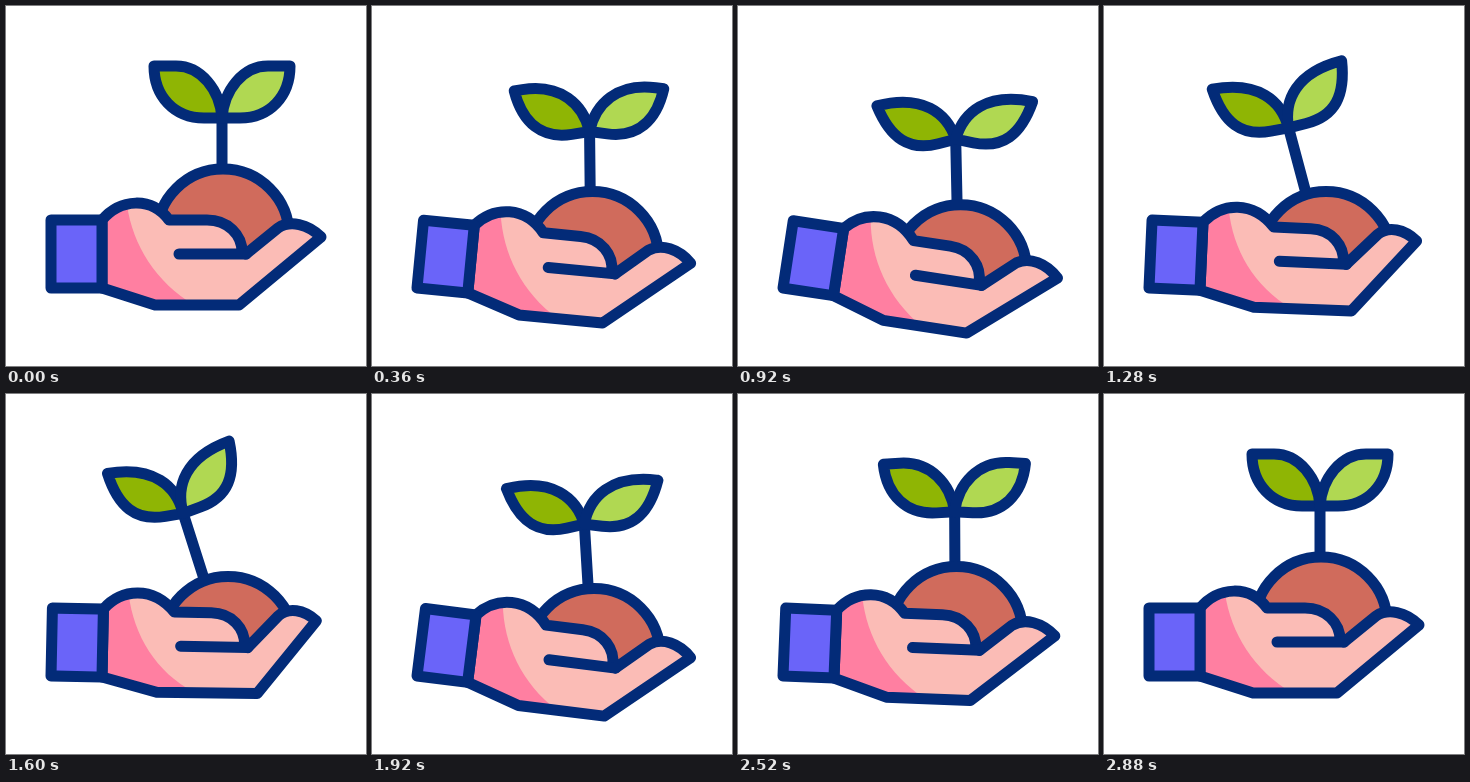
Write an HTML page that moves like this. It is 360x360 px and loops after 3000 ms.

```html
<!DOCTYPE html>
<html lang="en">
<head>
<meta charset="utf-8">
<title>Seedling in hand</title>
<style>
  html, body { margin: 0; width: 100%; height: 100%; overflow: hidden; background: #fff; }
  svg { display: block; width: 100vw; height: 100vh; }
  .line { stroke: #032b78; stroke-width: 11; stroke-linecap: round; stroke-linejoin: round; }
</style>
</head>
<body>
<svg viewBox="0 0 360 360" fill="none">
  <path id="stem" class="line"/>
  <path id="soilFill" fill="#d06b5c"/>
  <path id="soilArc" class="line"/>
  <path id="leftLeaf" class="line" fill="#8fb504"/>
  <path id="rightLeaf" class="line" fill="#b0d852"/>
  <g id="arm">
    <path id="handFill" fill="#fbbcb6"/>
    <path id="shade" fill="#ff7fa1"/>
    <path id="handLine" class="line"/>
    <path id="palmLine" class="line"/>
    <path class="line" fill="#6a64f9" d="M45 214H96V282H45Z"/>
  </g>
</svg>
<script>
const LOOP = 3000, STEP = 40, RADIUS = 66, SECOND_DIP = 0.93;

const set = (id, name, value) => document.getElementById(id).setAttribute(name, value);

// Smooth rise from 0 to 1 that leaves quickly and settles slowly.
function ramp(time, start, end) {
  const u = Math.min(1, Math.max(0, (time - start) / (end - start)));
  const v = 1 - (1 - u) ** 1.4;
  return v * v * (3 - 2 * v);
}

// The hand dips under the weight, the plant leans as it rises, then a softer dip follows.
function weights(time) {
  const rise = ramp(time, 880, 1560), fall = ramp(time, 1560, 2120);
  return {
    dip: ramp(time, 80, 680) - rise + SECOND_DIP * (fall - ramp(time, 2120, 2880)),
    lean: rise - fall
  };
}

// A leaf pointing up and left from its joint; its square corner softens into a lens.
function leaf(soft) {
  const toTip = (x, y) => `${x + (-68 - x) * soft} ${y + (-52 - y) * soft}`;
  return `M-68-52L${toTip(-46, -52)}C-21-52-2-28 0 0H-18`
    + `C-48 0 ${-68 + 5 * soft} ${-22 + 5 * soft}-68-52Z`;
}

function draw(time) {
  const { dip, lean } = weights(time);
  const soft = Math.min(1, dip + lean);
  const mix = (rest, dipped, leaning) => rest + dipped * dip + leaning * lean;
  const bent = (x, y, dx, dy) => `${x + dx * lean} ${y + dy * lean}`;
  const eased = (x, y, dx, dy) => `${x + dx * soft} ${y + dy * soft}`;

  const sx = mix(217, 5.5, 5), sy = mix(229, 36, 19);
  const jx = mix(216, 2.5, -40), jy = mix(112, 21.5, 7);
  const foot = mix(216, 3.5, -18);
  const footY = sy - Math.sqrt(RADIUS ** 2 - (foot - sx) ** 2);
  set('stem', 'd', `M${foot} ${footY}L${jx} ${jy}`);

  const shape = leaf(soft);
  set('leftLeaf', 'd', shape);
  set('rightLeaf', 'd', shape);
  set('leftLeaf', 'transform', `translate(${jx} ${jy}) rotate(${mix(0, -14.5, -9.5)})`);
  set('rightLeaf', 'transform', `translate(${jx} ${jy}) rotate(${mix(0, 12, -21)}) scale(-1 1)`);

  const arc = `M${sx - RADIUS} ${sy}A${RADIUS} ${RADIUS} 0 0 1 ${sx + RADIUS} ${sy}`;
  set('soilArc', 'd', arc);
  set('soilFill', 'd', `${arc}L${sx + 20} ${sy + 22}Z`);

  const heel = bent(149, 299, 2, -3), wrist = bent(233, 299, 19, -4), tip = bent(315, 231, -6, -10);
  const crotch = eased(240, 248, 1, 1.5);
  const finger = `${eased(163, 214, 4, 1.5)}L${eased(201, 214, 3, 1.5)}`
    + `C${eased(222, 214, 3, 1.5)} ${eased(236, 229, 2, 1.5)} ${eased(236, 246, 2, 1.5)}`;
  const thumb = `L${bent(272, 222, -1, -5)}C${bent(284, 214, -3, -6)} ${bent(302, 218, -6, -8)} ${tip}`;
  const hand = `M96 214C114 193 145 190 ${finger}L${crotch}${thumb}L${wrist}L${heel}L96 282Z`;
  set('handFill', 'd', hand);
  set('handLine', 'd', hand);
  set('palmLine', 'd', `M${eased(173, 248, 1, 1.5)}L${crotch}`);
  set('shade', 'd', `M96 214L121 199C127 240 150 276 ${bent(188, 299, 0, -4)}L${heel}L96 282Z`);
  set('arm', 'transform', `rotate(${mix(0, 8.8, 1)} 45 282)`);
}

const start = performance.now();
function tick() {
  const time = (performance.now() - start) % LOOP;
  draw(Math.floor(time / STEP) * STEP);
  requestAnimationFrame(tick);
}
tick();
</script>
</body>
</html>
```
